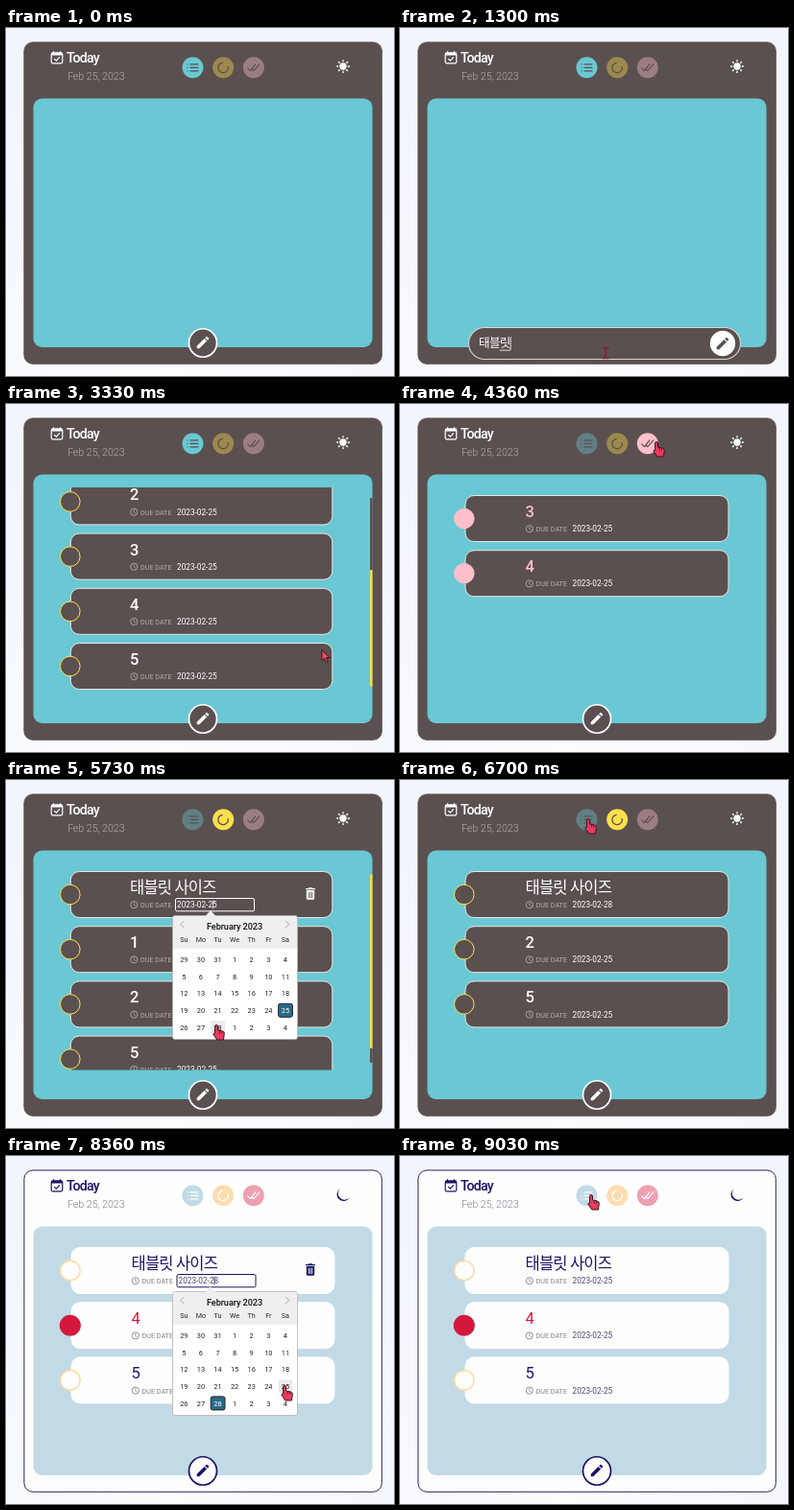
Write an HTML page that moves like this. It is 404 px wide and 363 px high and loops after 9610 ms.

```html
<!DOCTYPE html>
<html lang="ko">
<head>
<meta charset="utf-8">
<title>Today</title>
<style>
  html, body { margin: 0; width: 100%; height: 100%; overflow: hidden; }
  body { background: radial-gradient(circle at 42% 100%, #fdfdff, #f3f5fd 75%); }
  svg { display: block; width: 404px; height: 363px; font-family: Roboto, "Noto Sans CJK KR", "Noto Sans CJK", sans-serif; }
  text { white-space: pre; }
</style>
</head>
<body>
<svg id="stage" viewBox="0 0 404 363"></svg>
<script>
const LOOP = 9610;
const stage = document.getElementById('stage');

const dark = {
  bg: '#5b5050', edge: '#5b5050', panel: '#69c8d3', text: '#ffffff', sub: '#b5abab', date: '#ffffff',
  all: '#69c8d3', wait: '#ffe04a', done: '#ffc0cb', icon: '#5b5050', line: '#e9e5e5', thumb: '#eedc4e', track: '#5b5050'
};
const light = {
  bg: '#fefeff', edge: '#28215f', panel: '#c1dae6', text: '#1b1464', sub: '#85818f', date: '#4a4570',
  all: '#c1dae6', wait: '#ffaa3c', done: '#d4183d', icon: '#ffffff', line: '#fefeff', thumb: '#ffd04f', track: '#5c5a60'
};

// [time, x, y, shape]
const pointer = [
  [450, 236, 126, 'arrow'], [570, 205, 326, 'hand'], [640, 205, 326, 'hand'], [790, 214, 339, 'beam'],
  [2580, 214, 339, 'arrow'], [2730, 377, 252, 'arrow'], [2850, 377, 252, 'arrow'], [3040, 385, 262, 'arrow'],
  [3260, 385, 290, 'arrow'], [3420, 250, 210, 'arrow'], [3580, 250, 210, 'arrow'], [3700, 66, 156, 'hand'],
  [3800, 66, 156, 'hand'], [3900, 66, 213, 'hand'], [4010, 66, 213, 'arrow'], [4240, 267, 40, 'hand'],
  [4580, 267, 40, 'hand'], [4650, 228, 41, 'hand'], [4720, 228, 41, 'arrow'], [4850, 215, 112, 'arrow'],
  [5000, 215, 112, 'arrow'], [5100, 214, 130, 'beam'], [5250, 214, 130, 'arrow'], [5330, 240, 190, 'hand'],
  [5650, 219, 256, 'hand'], [6020, 219, 256, 'arrow'], [6210, 316, 173, 'hand'], [6420, 316, 173, 'arrow'],
  [6610, 316, 173, 'arrow'], [6700, 196, 41, 'hand'], [7000, 196, 41, 'arrow'], [7090, 355, 43, 'hand'],
  [7640, 355, 43, 'arrow'], [7770, 316, 173, 'hand'], [7980, 316, 173, 'arrow'], [8090, 214, 130, 'beam'],
  [8160, 214, 130, 'hand'], [8330, 290, 240, 'hand'], [8420, 290, 240, 'arrow'], [8580, 280, 130, 'arrow'],
  [8690, 228, 41, 'hand'], [8750, 228, 41, 'hand'], [8820, 259, 41, 'hand'], [8880, 259, 41, 'hand'], [9000, 199, 41, 'hand']
];
// [time, left, right]
const pillKeys = [[560, 190, 220], [760, 71, 355], [2700, 71, 355], [2714, 71, 340], [2860, 190, 220]];
const scrollKeys = [[2880, 0], [3280, 132], [4200, 132], [4220, 0]];

const events = [];
const at = (time, run) => events.push([time, run]);
const type = (time, text) => at(time, s => { s.input = text; });
const add = (time, name) => at(time, s => { s.input = ''; s.items.push({ name, date: '2023-02-25', done: false }); });
const finish = (time, name) => at(time, s => { s.items.find(i => i.name === name).done = true; });
const drop = (time, name) => at(time, s => { s.items = s.items.filter(i => i.name !== name); });
const tab = (time, name) => at(time, s => { s.tab = name; });
const pick = (time, day) => {
  at(time[0], s => { s.picker = true; });
  at(time[1], s => { s.picker = false; s.items[0].date = '2023-02-' + day; });
};

['ㅌ', '태', '탭', '태브', '태블', '태블ㄹ', '태블리', '태블릿', '태블릿 ', '태블릿 ㅅ',
 '태블릿 사', '태블릿 상', '태블릿 사이', '태블릿 사잊', '태블릿 사이즈'].forEach((s, i) => type(940 + i * 47, s));
add(1730, '태블릿 사이즈');
for (let n = 1; n <= 5; n++) {
  type(1760 + n * 140, '' + n);
  add(1840 + n * 140, '' + n);
}
finish(3740, '3');
finish(3940, '4');
tab(4270, 'done');
tab(4670, 'wait');
pick([5150, 6010], 28);
drop(6390, '1');
tab(6720, 'all');
drop(7830, '2');
drop(7940, '3');
pick([8120, 8390], 25);
tab(8710, 'wait');
tab(8850, 'done');
tab(9000, 'all');

function stateAt(t) {
  const s = { items: [], tab: 'all', input: '', picker: false };
  for (const [time, run] of events) if (t >= time) run(s);
  return s;
}

const clamp = v => Math.max(0, Math.min(1, v));
const ease = p => p * p * (3 - 2 * p);
const lerp = (a, b, p) => a + (b - a) * p;

function sample(keys, t) {
  const i = keys.findIndex(k => k[0] > t);
  if (i === 0) return keys[0].slice(1);
  if (i < 0) return keys[keys.length - 1].slice(1);
  const a = keys[i - 1], b = keys[i];
  const p = ease((t - a[0]) / (b[0] - a[0]));
  return a.slice(1).map((v, k) => typeof v === 'number' ? lerp(v, b[k + 1], p) : v);
}

function mix(a, b, p) {
  const channel = (hex, k) => parseInt(hex.substr(1 + 2 * k, 2), 16);
  return `rgb(${[0, 1, 2].map(k => Math.round(lerp(channel(a, k), channel(b, k), p)))})`;
}

function themeAt(t) {
  const p = ease(clamp((t - 7230) / 200));
  const c = {};
  for (const key in dark) c[key] = mix(dark[key], light[key], p);
  c.p = p;
  return c;
}

const rect = (x, y, w, h, r, fill, stroke = 'none', sw = 1) =>
  `<rect x="${x}" y="${y}" width="${w}" height="${h}" rx="${r}" fill="${fill}" stroke="${stroke}" stroke-width="${sw}"/>`;
const circle = (x, y, r, fill, stroke = 'none', sw = 1) =>
  `<circle cx="${x}" cy="${y}" r="${r}" fill="${fill}" stroke="${stroke}" stroke-width="${sw}"/>`;
const line = (d, color, sw = 1) =>
  `<path d="${d}" fill="none" stroke="${color}" stroke-width="${sw}" stroke-linecap="round" stroke-linejoin="round"/>`;
const shape = (d, fill, extra = '') => `<path d="${d}" fill="${fill}" ${extra}/>`;
const label = (x, y, size, fill, str, extra = '') =>
  `<text x="${x}" y="${y}" font-size="${size}" fill="${fill}" ${extra}>${str}</text>`;
const move = (x, y, body, k = 1) => `<g transform="translate(${x} ${y}) scale(${k})">${body}</g>`;

const pencil = (x, y, fill) => move(x - 8.4, y - 8.4, shape(
  'M3 17.25V21h3.75L17.81 9.94l-3.75-3.75zM20.71 7.04a1 1 0 0 0 0-1.41l-2.34-2.34a1 1 0 0 0-1.41 0l-1.83 1.83 3.75 3.75z', fill), .7);

const trash = (x, y, c) => move(x - 8.4, y - 8.4, shape(
  'M6 19a2 2 0 0 0 2 2h8a2 2 0 0 0 2-2V7H6zM19 4h-3.5l-1-1h-5l-1 1H5v2h14z', c.text) +
  line('M9.5 10v8M12 10v8M14.5 10v8', c.bg, 1.2), .7);

const tabIcons = {
  all: c => line('M-2.5-3.5h8M-2.5 0h8M-2.5 3.5h8M-5.5-3.5h.1M-5.5 0h.1M-5.5 3.5h.1', c, 1.2),
  wait: c => line('M-1-5A5.2 5.2 0 1 0 5-1', c, 1.3),
  done: c => line('M-6 .5l2.7 2.8L2-3.5M-2 1.2l2 2.1L6-3.5', c, 1.2)
};

function header(c, s) {
  let out = rect(47.2, 26.2, 11.6, 10.6, 1.5, 'none', c.text, 1.2) + rect(47, 25.5, 12, 3, 1, c.text) +
    line('M49.5 24.6v1M56.5 24.6v1', c.text, 1.2) + line('M50.5 32.3l1.8 1.8 3.3-3.5', c.text, 1.2) +
    label(63, 36, 14.2, c.text, 'Today', 'font-weight="500" letter-spacing="-.75"') +
    label(64, 54, 10.8, c.sub, 'Feb 25, 2023', 'font-weight="300" letter-spacing="-.1"');
  Object.keys(tabIcons).forEach((name, i) => {
    out += `<g opacity="${s.tab === name || (c.p > .5 && name === 'all') ? 1 : .4}">` +
      move([194.5, 226.2, 257.8][i], 41.3, circle(0, 0, 11, c[name]) + tabIcons[name](c.icon)) + '</g>';
  });
  if (c.p < .5) {
    let rays = '';
    for (let k = 0; k < 8; k++) {
      const x = Math.cos(k * Math.PI / 4), y = Math.sin(k * Math.PI / 4);
      rays += `M${x * 5.3} ${y * 5.3}L${x * 6.4} ${y * 6.4}`;
    }
    out += move(351, 40, circle(0, 0, 3.7, c.text) + line(rays, c.text, 1.4));
  } else {
    out += shape('M347.6 34.2a7 7 0 1 0 9.9 9.4a6.8 6.8 0 0 1-9.9-9.4z', c.text);
  }
  return out;
}

function card(c, item, i, shift, wide, active, editing) {
  const x = wide ? 68 : 67.3, y = 95.5 + i * 57.2 - shift, tx = wide ? 1.5 : 0;
  const tint = item.done ? c.done : c.text;
  const ring = mix(dark.wait, '#ffd9a4', c.p);
  let out = rect(x, y, wide ? 274 : 272.5, 48, 9, c.bg, c.line) +
    circle(66.8, y + 24, 10.3, item.done ? c.done : c.bg, item.done ? c.done : ring, 1 + c.p * .5) +
    label(129 + tx, y + 22.5, 16.5, tint, item.name, `font-weight="${c.p < .5 ? 500 : 400}" letter-spacing="-.8"`) +
    circle(133.3 + tx, y + 34.7, 3.6, 'none', c.sub, .9) + line(`M${133.3 + tx} ${y + 32.7}v2.2l1.4.9`, c.sub, .8) +
    label(140 + tx, y + 37.6, 7.2, c.sub, 'DUE DATE');
  if (editing) out += rect(176.5 + tx, y + 28, 82, 13.3, 1.5, c.bg, c.text) + line(`M${215.5 + tx} ${y + 30.5}v8`, c.text, .7);
  out += label(178 + tx, y + 37.7, 8.25, c.date, item.date);
  if (active) out += trash(317, y + 23, c);
  return out;
}

function list(c, s, t, px, py) {
  const rows = s.items.filter(i => s.tab === 'all' || i.done === (s.tab === 'done'));
  const wide = rows.length < 4;
  const shift = wide ? 0 : sample(scrollKeys, t)[0];
  const content = rows.length * 57.2 + 4;
  const max = Math.max(0, content - 215), top = Math.min(shift, max);
  let out = '<clipPath id="view"><rect x="50" y="87" width="300" height="215.5"/></clipPath><g clip-path="url(#view)">';
  rows.forEach((item, i) => {
    const y = 95.5 + i * 57.2 - top;
    const over = t > 3500 && px > 67 && px < 340 && py > y && py < y + 48;
    const editing = s.picker && i === 0;
    out += card(c, item, i, top, wide, s.picker ? editing : over, editing);
  });
  out += '</g>';
  if (!wide) {
    const k = 197 / content;
    out += rect(379, 98, 2.6, 197, 1, c.track) + rect(379, 98 + top * k, 2.6, 215 * k, 1, c.thumb);
  }
  return out;
}

function picker(s, t, px, py) {
  const chosen = +s.items[0].date.slice(-2);
  const mid = 'text-anchor="middle"';
  let out = rect(173.5, 141.5, 130, 129, 2.5, '#ffffff', '#b5b0b0', .8) +
    shape('M174 176V144q0-2 2-2h125q2 0 2 2v32z', '#f0eff0') + shape('M207.5 142l5.5-6 5.5 6z', '#f0eff0') +
    line('M185 147.5l-3.5 3 3.5 3M291.5 147.5l3.5 3-3.5 3', '#c4c4c4', 1.3) +
    label(238, 155.5, 9.2, '#111', 'February 2023', mid + ' font-weight="500" letter-spacing="-.1"');
  const col = k => 185.3 + k * 17.6;
  'Su Mo Tu We Th Fr Sa'.split(' ').forEach((d, k) => { out += label(col(k), 169, 7.2, '#222', d, mid); });
  for (let n = 0; n < 35; n++) {
    const x = col(n % 7), y = 187.5 + Math.floor(n / 7) * 17.6;
    const day = n < 3 ? 29 + n : (n - 3) % 28 + 1;
    const own = n >= 3 && n < 31 && day === chosen;
    if (own) out += rect(x - 7.3, y - 7, 14.8, 14, 2, '#286a8b', '#222', 1);
    else if (Math.abs(px - x) < 8 && Math.abs(py + 2 - y) < 8) out += rect(x - 7.3, y - 7, 14.8, 14, 2, '#ebebeb');
    out += label(x, y + 2.6, 7.4, own ? '#fff' : '#222', day, mid);
  }
  return out;
}

function composer(c, s, t) {
  const [l, r] = sample(pillKeys, t);
  const open = t >= 740 && t < 2710;
  const h = open ? 33 : 29.5, y = 328.5 - h / 2 + (open ? .5 : 0);
  let out = rect(l + .5, y, r - l - 1, h, h / 2, c.bg, open ? '#d9d4d4' : c.text, open ? 1.1 : 1.7);
  if (!open) return out + pencil(r - 15, 328, c.text);
  out += circle(336, 329, 13.2, c.text) + pencil(336, 329, c.bg);
  let end = 82;
  for (const ch of s.input) end += ch === ' ' ? 2.2 : ch < '~' ? 6.4 : 10.9;
  out += label(82, 333, 12.5, c.text, s.input, 'letter-spacing="-.6"');
  if (s.input.slice(-1) > '~') out += line(`M${end - 10.5} 336.2H${end}`, c.text, .8);
  return out + line(`M${end + .5} 322.5v13`, c.text, .8);
}

const cursors = {
  arrow: shape('M0 0v11l2.7-2.4 1.9 4 1.9-.9-1.9-3.9h3.7z', '#f2486b', 'stroke="#3a1822" stroke-width="1"'),
  hand: shape('M-1.4 1q0-1.5 1.4-1.5T1.5 1v4l5 1q2 .5 1.8 2.5l-.8 6.5H.8L-3 9.5q-.6-1.7 1.6-1.2z', '#e63c5e', 'stroke="#3a1822" stroke-width="1"') +
    line('M3.4 5.8v2.2M5.6 6.3v2', '#3a1822', .7),
  beam: line('M-3-5.5h2.2L0-4.8l.8-.7H3M-3 5.5h2.2L0 4.8l.8.7H3M0-4.8v9.6', '#8f1830', 1.5)
};

function scene(t) {
  const c = themeAt(t), s = stateAt(t);
  const [px, py, kind] = sample(pointer, t);
  return rect(18.9, 14.9, 372.4, 335.4, 9, c.bg, c.edge) + header(c, s) +
    rect(28.5, 73.5, 353, 259.5, 9, c.panel) + list(c, s, t, px, py) + composer(c, s, t) +
    (s.picker ? picker(s, t, px, py) : '') +
    (t >= 450 ? move(px, py, cursors[kind]) : '');
}

let last = '';
function frame(now) {
  const next = scene(now % LOOP);
  if (next !== last) stage.innerHTML = last = next;
  requestAnimationFrame(frame);
}
frame(0);
</script>
</body>
</html>
```
